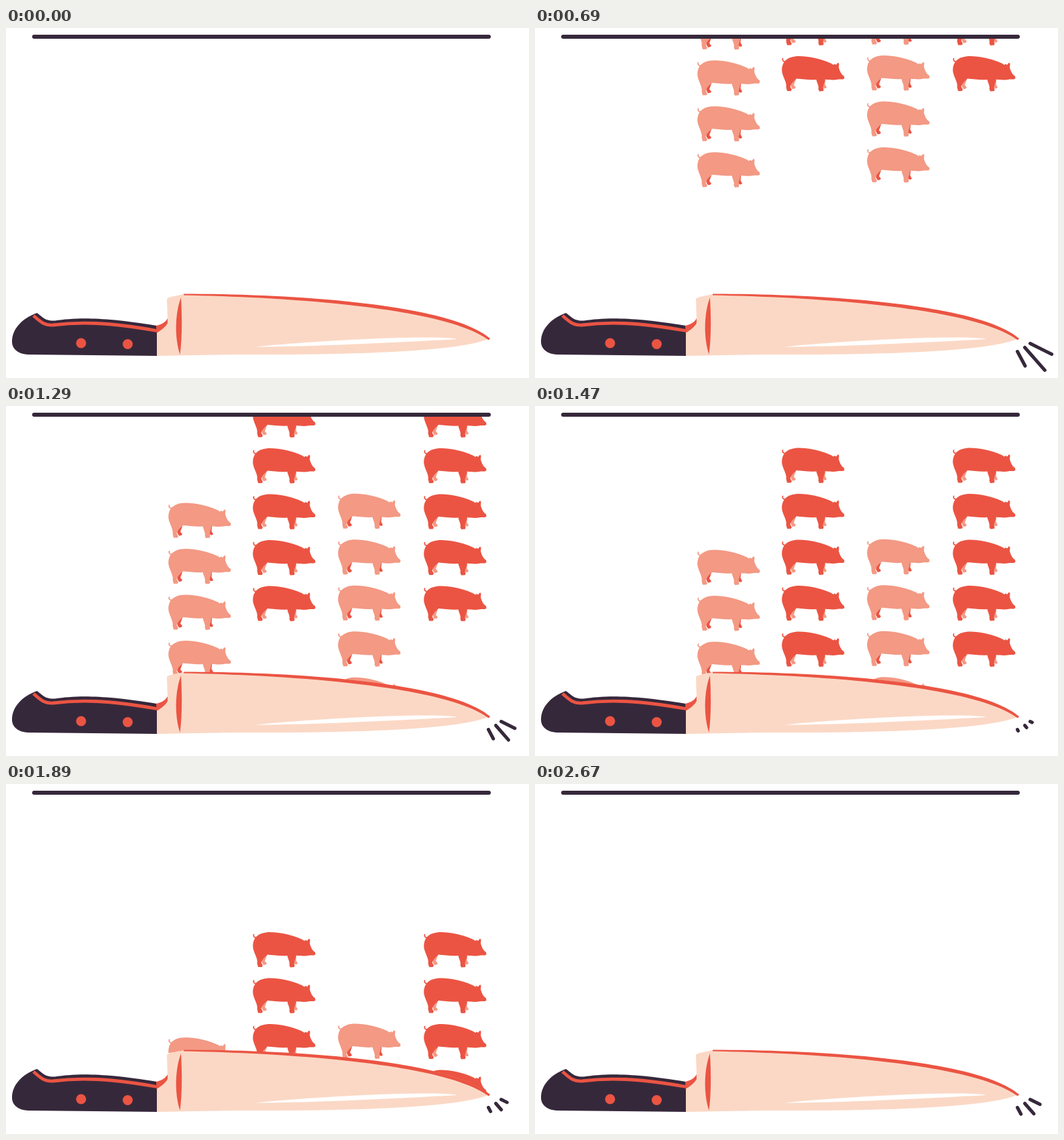
Animation of 780x522 px, one loop 2.7 s. Source, as an HTML page:

```html
<!DOCTYPE html>
<html lang="en">
<head>
<meta charset="utf-8">
<title>Falling pigs</title>
<style>
  html, body { margin: 0; width: 100%; height: 100%; overflow: hidden; background: #fff; }
  svg { display: block; width: 780px; height: 522px; }
  .dark { fill: #36283b; }
  .red { fill: #eb5443; }
  .peach { fill: #fbd8c5; }
  .light { --skin: #f39984; --far: #eb5443; }
  .deep { --skin: #eb5443; --far: #f39984; }
  .skin { fill: var(--skin); }
  .far { fill: var(--far); }
  .tail { fill: none; stroke: var(--skin); stroke-width: 1.8; stroke-linecap: round; }
  .ink { fill: none; stroke: #36283b; stroke-linecap: round; }
</style>
</head>
<body>
<svg viewBox="0 0 780 522">
  <defs>
    <clipPath id="air">
      <path d="M238 16H722V464C660 413 420 398 265 398L238 402Z"/>
    </clipPath>
    <g id="pig">
      <path class="far" d="M23 32L20.500 39L19 43L22 46.500L20.500 48.500L17 49L14.500 45L14 35ZM60 33L66.500 33L65.500 42L68 46.500L66.500 48L64 48L61 45Z"/>
      <path class="tail" d="M2.500 3.500C1.500 6 3 8 6 8"/>
      <path class="skin" d="M6 7C11 2 18 0 27 0C42 0 57 4 68 8C72 9.500 75 11 78 13L80 11.500L82 13L85 9.500L86.500 11.500L86 17C87.500 22 89.500 27 94 30L94.500 33L92.500 34.500L86 34.500C79 36 73 35.500 65.500 34.500C65 41 61 46 63.500 49L63 52L57 52.500L55.500 49C57 45 53.500 40 52.500 35C42 36 32 34 23 33.500C20 36 15.500 40 13.500 45L16 50L14.500 52L9 52L7.500 46C9 41 4 33 2 26C0 19 2 11 6 7Z"/>
    </g>
  </defs>

  <g id="pigs" clip-path="url(#air)"></g>

  <path class="ink" d="M42 13H720" stroke-width="6"/>

  <path class="dark" d="M46 425C53 429 57 437.500 73 436.500C105 432 142 430.500 225 444V489L33 487C16 486 9 477 9 468C9 450 22 434 46 425Z"/>
  <path d="M41 429C50 437 56 443.500 70 443C110 438 150 438.500 225 451.500" fill="none" stroke="#eb5443" stroke-width="4.800"/>
  <circle class="red" cx="112" cy="470" r="7.500"/>
  <circle class="red" cx="181.500" cy="471.500" r="7.500"/>

  <path class="peach" d="M240 404C244 400 253 400 265 397C420 397 660 410 721 463C690 478 580 486 420 487L340 487L225 489V450L241 436Z"/>
  <path class="red" d="M224 444C234 442 239 437 241 433V440C238 446 232 450 224.500 455Z"/>
  <path class="red" d="M261 402C252 425 251 462 259.500 487C263 460 262.500 430 261 402Z"/>
  <path class="red" d="M265 396.500C420 396.500 660 410 722 463L720 465.500C655 416.500 420 401.500 265 398.500Z"/>
  <path d="M371 475.500C430 469 560 461 635 461.500C660 462 672 463 672 464C600 468 470 475 371 475.500Z" fill="#fff"/>

  <path class="ink" id="burst" stroke-width="5"/>
</svg>
<script>
  const LOOP = 2700, STEP = 30, PULSE = 360, GAP = 68.5, COUNT = 5;

  // y: top pig's position at t = 0, v: fall speed in px/ms
  const columns = [
    { x: 241, y: -357.1, v: 0.3889, tone: 'light' },
    { x: 367, y: -492.4, v: 0.3775, tone: 'deep' },
    { x: 494, y: -356.8, v: 0.378, tone: 'light' },
    { x: 622, y: -492.4, v: 0.3775, tone: 'deep' }
  ];
  // start point and full extent of each spark line
  const sparks = [
    [719.5, 482.5, 12.5, 23.5],
    [730.5, 476.5, 32.5, 37],
    [738.5, 470.5, 35, 17.5]
  ];

  const svgEl = name => document.createElementNS('http://www.w3.org/2000/svg', name);
  const pigs = document.getElementById('pigs');
  const burst = document.getElementById('burst');

  for (const col of columns) {
    col.el = pigs.appendChild(svgEl('g'));
    col.el.setAttribute('class', col.tone);
    for (let i = 0; i < COUNT; i++) {
      const pig = col.el.appendChild(svgEl('use'));
      pig.setAttribute('href', '#pig');
      pig.setAttribute('y', i * GAP);
    }
  }

  function draw(t) {
    for (const { el, x, y, v } of columns) {
      el.setAttribute('transform', `translate(${x} ${y + v * t})`);
    }
    const k = t ? ((t - STEP) % PULSE + STEP) / PULSE : 0;
    burst.setAttribute('d', k
      ? sparks.map(([x, y, dx, dy]) => `M${x} ${y}l${dx * k} ${dy * k}`).join('')
      : '');
  }

  const start = performance.now();
  function tick() {
    const t = (performance.now() - start) % LOOP;
    draw(Math.floor(t / STEP) * STEP);
    requestAnimationFrame(tick);
  }
  tick();
</script>
</body>
</html>
```
